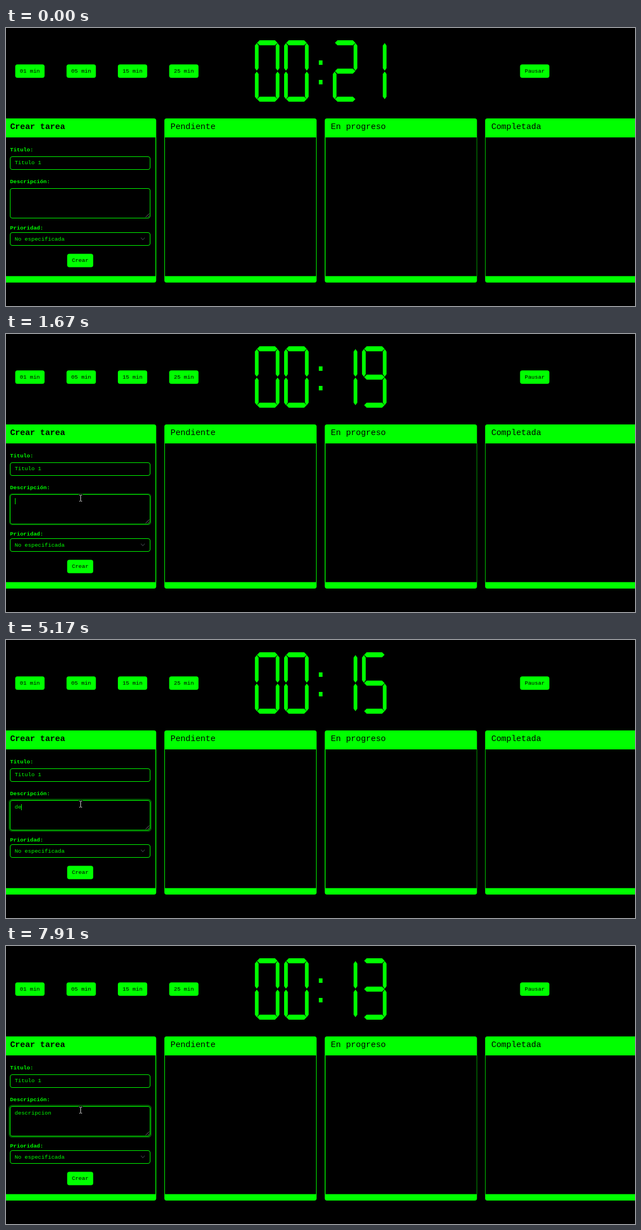
An HTML page with a canvas that plays this animation: 1124 by 498 pixels, repeating every 8 s.

```html
<!DOCTYPE html>
<html lang="es">
<head>
<meta charset="utf-8">
<title>Temporizador y tareas</title>
<style>
  html, body { margin: 0; width: 100%; height: 100%; overflow: hidden; background: #000; }
  canvas { display: block; }
</style>
</head>
<body>
<canvas id="stage" width="1124" height="498"></canvas>
<script>
const ctx = document.getElementById('stage').getContext('2d');
const GREEN = '#00ff00';
const LOOP = 8000;
const REM = 9.92;
const FAMILY = '"Liberation Mono", monospace';

// [time, value] steps; the last one reached applies
const SECONDS = [[0, 21], [70, 20], [1130, 19], [2130, 18], [3050, 17], [4100, 16], [5110, 15], [6130, 14], [7110, 13]];
const TYPED = [[0, 0], [4570, 1], [4700, 2], [5180, 3], [5240, 4], [5510, 5], [5710, 6], [6560, 7], [6760, 9], [7180, 10], [7380, 11]];
const CARET = [[0, 0], [1540, 1], [2060, 0], [2590, 1], [3050, 0], [3770, 1], [4240, 0], [4570, 1], [6290, 0], [6560, 1], [7910, 0]];
const POINTER = [
  [0, null],
  [240, { arrow: true, x: 690, y: 418 }],
  [310, { arrow: true, x: 371, y: 346 }],
  [380, { x: 136, y: 294 }],
  [530, { x: 135, y: 294 }],
  [600, { x: 134, y: 294 }],
  [750, { x: 133, y: 294 }]
];
const DIGITS = ['abcdef', 'bc', 'abdeg', 'abcdg', 'bcfg', 'acdfg', 'acdefg', 'abc', 'abcdefg', 'abcdfg'];

function at(steps, t) {
  let value = steps[0][1];
  for (const [time, next] of steps) if (t >= time) value = next;
  return value;
}

function text(str, x, y, { size = REM, color = GREEN, bold = false, align = 'left' } = {}) {
  ctx.font = `${bold ? 'bold ' : ''}${size}px ${FAMILY}`;
  ctx.textAlign = align;
  ctx.fillStyle = color;
  ctx.fillText(str, x, y);
}

function roundBox(x, y, w, h, r) {
  ctx.beginPath();
  ctx.roundRect(x, y, w, h, r);
}

function fillBox(x, y, w, h, r, color = GREEN) {
  roundBox(x, y, w, h, r);
  ctx.fillStyle = color;
  ctx.fill();
}

function polygon(points, color = GREEN) {
  ctx.beginPath();
  points.forEach(([x, y]) => ctx.lineTo(x, y));
  ctx.closePath();
  ctx.fillStyle = color;
  ctx.fill();
}

function polyline(points, color, width = 1) {
  ctx.beginPath();
  points.forEach(([x, y]) => ctx.lineTo(x, y));
  ctx.strokeStyle = color;
  ctx.lineWidth = width;
  ctx.stroke();
}

function button(label, x, y, w) {
  fillBox(x, y, w, 24, 4);
  text(label, x + w / 2, y + 14.7, { color: '#000', align: 'center' });
}

function field(y, h) {
  roundBox(7.5, y + 0.5, 250, h - 1, 3.5);
  ctx.strokeStyle = GREEN;
  ctx.lineWidth = 1;
  ctx.stroke();
}

function barAcross(x, y) {
  polygon([[x, y + 4.5], [x + 4.5, y], [x + 32, y], [x + 36.5, y + 4.5], [x + 32, y + 9], [x + 4.5, y + 9]]);
}

function barDown(x, y) {
  polygon([[x, y + 4.5], [x + 3.3, y], [x + 6.6, y + 4.5], [x + 6.6, y + 45], [x + 3.3, y + 49.5], [x, y + 45]]);
}

function digit(n, x) {
  const bars = {
    a: () => barAcross(x + 3.8, 22),
    g: () => barAcross(x + 3.8, 72.7),
    d: () => barAcross(x + 3.8, 123),
    f: () => barDown(x, 27),
    b: () => barDown(x + 37.2, 27),
    e: () => barDown(x, 78),
    c: () => barDown(x + 37.2, 78)
  };
  for (const key of DIGITS[n]) bars[key]();
}

function clock(seconds) {
  digit(0, 444.8);
  digit(0, 497);
  ctx.fillStyle = GREEN;
  ctx.fillRect(559, 58, 6.6, 8);
  ctx.fillRect(559, 93, 6.6, 8);
  digit(Math.floor(seconds / 10), 584);
  digit(seconds % 10, 636.2);
}

function panel(title, i) {
  const x = -3.6 + i * 286.6;
  fillBox(x, 162, 272, 294, 4);
  ctx.fillStyle = '#000';
  ctx.fillRect(Math.round(x) + 1, 196, 270, 248.5);
  text(title, x + 11, 180.7, { size: REM * 1.5, color: '#000', bold: i === 0 });
}

function form(t) {
  text('Titulo:', 7.3, 221, { bold: true });
  field(230, 24);
  text('Titulo 1', 15.5, 244.3);

  text('Descripción:', 7.3, 278.3, { bold: true });
  // focus ring grows in four steps
  const focus = Math.max(0, Math.min(4, Math.floor((t - 1540) / 63.3) + 1)) / 4;
  if (focus > 0) {
    const s = 2.4 * focus;
    fillBox(7 - s, 287 - s, 251 + 2 * s, 54 + 2 * s, 4 + s, `rgba(0,255,0,${0.32 * focus})`);
    fillBox(7, 287, 251, 54, 4, '#000');
  }
  field(287, 54);
  polyline([[249.5, 339], [256, 332.5]], '#8c8c8c', 0.9);
  polyline([[253.5, 339], [256, 336.5]], '#8c8c8c', 0.9);

  const count = at(TYPED, t);
  text('descripcion'.slice(0, count), 15.5, 302.2);
  if (at(CARET, t)) {
    ctx.fillStyle = GREEN;
    ctx.fillRect(Math.floor(16 + count * REM * 0.6), 294, 1, 11);
  }

  text('Prioridad:', 7.3, 361, { bold: true });
  field(366, 24);
  text('No especificada', 15.5, 381);
  polyline([[241, 375.7], [244.5, 379.3], [248, 375.7]], '#343a40', 1.2);
  button('Crear', 109.3, 404.5, 46.5);
}

function pointer(p) {
  if (!p) return;
  const { x, y } = p;
  if (p.arrow) {
    const shape = [[0, 0], [0, 15], [3.4, 11.8], [5.8, 17], [8, 16], [5.7, 11], [10.5, 11]];
    polygon(shape.map(([dx, dy]) => [x + dx, y + dy]), '#fff');
    return;
  }
  ctx.fillStyle = '#000';
  ctx.fillRect(x - 3, y - 7, 7, 3);
  ctx.fillRect(x - 1, y - 5, 3, 10);
  ctx.fillStyle = '#d8d8d8';
  ctx.fillRect(x, y - 5, 1, 10);
  for (const end of [y - 6, y + 5]) {
    ctx.fillRect(x - 2, end, 2, 1);
    ctx.fillRect(x + 1, end, 2, 1);
  }
}

function draw(t) {
  ctx.fillStyle = '#000';
  ctx.fillRect(0, 0, 1124, 498);
  ['01', '05', '15', '25'].forEach((m, i) => button(`${m} min`, 16.5 + i * 91.7, 65.3, 52.4));
  clock(at(SECONDS, t));
  button('Pausar', 918.6, 65.3, 52.4);
  ['Crear tarea', 'Pendiente', 'En progreso', 'Completada'].forEach(panel);
  form(t);
  pointer(at(POINTER, t));
}

const start = performance.now();
function tick() {
  draw((performance.now() - start) % LOOP);
  requestAnimationFrame(tick);
}
tick();
</script>
</body>
</html>
```
